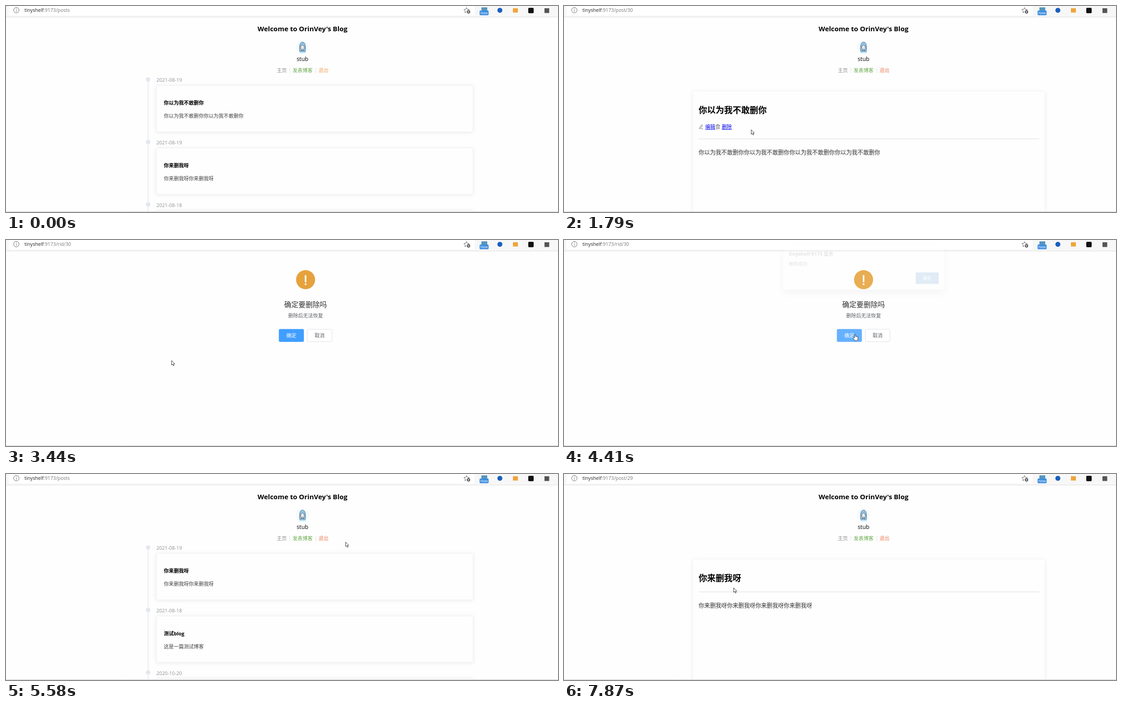
These frames come from a looping animation (1225 by 457 pixels, 8000 ms). An HTML page:

```html
<!DOCTYPE html>
<html lang="zh-CN">
<head>
<meta charset="utf-8">
<title>Blog</title>
<style>
html, body { margin: 0; width: 100%; height: 100%; overflow: hidden; background: #fefefe; }
svg { display: block; width: 1225px; height: 457px; }
text { font-family: "Open Sans", "Noto Sans CJK SC", "Noto Sans CJK", sans-serif; font-size: 11.06px; fill: #404245; white-space: pre; }
.mid { text-anchor: middle; }
.b { font-weight: 700; fill: #000; }
.url { font-size: 10.7px; fill: #767676; }
.url tspan { fill: #222; }
.date { font-size: 10.9px; fill: #8f9196; }
.h3 { font-size: 15px; }
.h2 { font-size: 18.9px; }
.body { font-size: 12.6px; fill: #333; }
.link { fill: #00e; text-decoration: underline; }
.card { fill: #fefefe; stroke: #eff1f6; filter: drop-shadow(0 1.6px 4.2px rgba(0,0,0,.08)); }
#sheet { stroke: none; }
.icon { fill: none; stroke: #5a5d62; stroke-width: .9; }
.dlg { filter: drop-shadow(0 8px 9px rgba(0,0,0,.32)); }

.scene, .anim { animation: 8s step-end infinite; }
#listA { --exit: #f2a35e; animation-name: listA; }
#postA { animation-name: postA; }
#remove { animation-name: remove; }
#listB { animation-name: listB; }
#postB { animation-name: postB; }
@keyframes listA { 0% { opacity: 1 } 18.125%, to { opacity: 0 } }
@keyframes postA { 0% { opacity: 0 } 18.125% { opacity: 1 } 43%, to { opacity: 0 } }
@keyframes remove { 0% { opacity: 0 } 43% { opacity: 1 } 67.125%, to { opacity: 0 } }
@keyframes listB { 0% { opacity: 0 } 67.125% { opacity: 1 } 85.25%, to { opacity: 0 } }
@keyframes postB { 0% { opacity: 0 } 85.25%, to { opacity: 1 } }

#titleA { animation-name: hoverA; }
#titleB { animation-name: hoverB; }
#del { animation-name: press; }
#ok { animation-name: okHover; }
#dialog { transform-origin: 665px 0; animation-name: dialog; }
@keyframes hoverA { 0% { fill: #000 } 10.5%, to { fill: #2a7556 } }
@keyframes hoverB { 0% { fill: #000 } 77.6%, to { fill: #2a7556 } }
@keyframes press { 0% { fill: #00e } 41.125%, to { fill: #f00 } }
@keyframes okHover { 0% { fill: #409eff } 51.5%, to { fill: #66b1ff } }
@keyframes dialog {
  0% { opacity: 0; transform: translateY(-14px) scale(1.014) }
  55.1% { opacity: .12; transform: translateY(-12.4px) scale(1.014) }
  56% { opacity: .45; transform: translateY(-7px) scale(1.008) }
  56.9% { opacity: .8; transform: translateY(-3px) scale(1.003) }
  57.8%, to { opacity: 1; transform: none }
}

#cursor { animation: move 8s steps(4, end) infinite, show 8s step-end infinite; }
#arrow { animation-name: arrow; }
#hand { animation-name: hand; }
#click { animation-name: click; }
@keyframes show { 0% { opacity: 0 } 1.625%, to { opacity: 1 } }
@keyframes move {
  0%, 1.625% { transform: translate(1033px, 446px) }
  5.125% { transform: translate(800px, 350px) }
  8.625% { transform: translate(480px, 238px) }
  11.375% { transform: translate(417px, 215px) }
  12.25%, 18.125% { transform: translate(415px, 213px) }
  21.625%, 23.25% { transform: translate(415px, 274px) }
  25% { transform: translate(385px, 272px) }
  28.5% { transform: translate(341px, 268px) }
  30.25% { transform: translate(367px, 268px) }
  32.875%, 43% { transform: translate(367px, 267px) }
  46.5% { transform: translate(450px, 245px) }
  50% { transform: translate(600px, 215px) }
  52.375%, 56% { transform: translate(646px, 209px) }
  59.5% { transform: translate(740px, 140px) }
  62.875%, 67.125% { transform: translate(793px, 92px) }
  70.625% { transform: translate(740px, 170px) }
  73.25% { transform: translate(636px, 236px) }
  75.875% { transform: translate(470px, 204px) }
  78.5%, 85.25% { transform: translate(371px, 214px) }
  87.875% { transform: translate(400px, 250px) }
  90.5% { transform: translate(437px, 270px) }
  93.125% { transform: translate(425px, 232px) }
  95.75% { transform: translate(385px, 262px) }
  98.375%, to { transform: translate(376px, 252px) }
}
@keyframes arrow {
  0%, 18.125%, 43%, 56.5%, 85.25% { opacity: 1 }
  10.5%, 28%, 51.5%, 77.6% { opacity: 0 }
  to { opacity: 1 }
}
@keyframes hand {
  0%, 18.125%, 43%, 56.5%, 85.25% { opacity: 0 }
  10.5%, 28%, 51.5%, 77.6% { opacity: 1 }
  to { opacity: 0 }
}
@keyframes click {
  0%, 17.4%, 43%, 55%, 67.125%, 85.25%, to { opacity: 0 }
  15.625%, 41.125%, 53.25%, 81.125% { opacity: .62 }
  63.75% { opacity: .5 }
}
</style>
</head>
<body>
<svg viewBox="0 0 1225 457">
  <defs>
    <g id="head">
      <text class="b h3 mid" x="658" y="55.5">Welcome to OrinVey's Blog</text>
      <circle cx="658" cy="91" r="14.5" fill="#f6fafd"/>
      <path d="M650.500 104.500q.5-5 7.500-5t7.500 5z" fill="#b5e0f5"/>
      <path d="M652 101q-1.500-5-.5-12 1-9 6.500-9t6.500 9q1 7-.5 12l-3-1h-6z" fill="#8fc3e6" stroke="#47647a" stroke-width=".9"/>
      <path d="M653.800 89q3-1 4.200-3 1.200 2 4.200 3v4q-.7 4-4.200 4.500-3.500-.5-4.200-4.500z" fill="#fff" stroke="#3c4650" stroke-width=".9"/>
      <path d="M655.300 91h1.700m2 0h1.700m-4 3.800h2.600M656 98v2.500m4-2.500v2.500" stroke="#333" stroke-width=".9"/>
      <text class="mid" x="658" y="122" style="font-size:12.6px;font-weight:500;fill:#000">stub</text>
      <text x="601" y="147.300" style="fill:#8e9095">主页</text>
      <text x="636" y="147.300" style="fill:#67a94a">发表博客</text>
      <text x="693.500" y="147.300" style="fill:var(--exit, #ea8158)">退出</text>
      <path d="M629.500 137v12M687.500 137v12" stroke="#dcdfe6"/>
    </g>
    <g id="item">
      <circle cx="315.300" cy="163" r="5" fill="#e4e7ed"/>
      <rect class="card" x="334" y="176.500" width="702.500" height="102.500" rx="3"/>
    </g>
    <g id="items">
      <path d="M315.500 163V457" stroke="#e4e7ed" stroke-width="1.600"/>
      <use href="#item"/>
      <use href="#item" y="138.600"/>
      <use href="#item" y="277.200"/>
    </g>
    <rect id="sheet" class="card" x="286.500" y="190" width="780.500" height="300" rx="3"/>
  </defs>

  <rect width="1225" height="457" fill="#fefefe"/>
  <rect width="1225" height="24" fill="#f7f7f7"/>
  <path d="M6 0H1040V17q0 4-4 4H10q-4 0-4-4z" fill="#fff"/>
  <path d="M0 24.500H1225" stroke="#dedede"/>
  <g fill="none" stroke="#666">
    <circle cx="23" cy="9.300" r="6"/>
    <path d="M23 8.500v4M23 5.800v1.300"/>
    <path d="M1022 3.500l1.800 3.800 4.200.5-3 3M1022 3.500l-1.800 3.800-4.200.5 3.100 2.900-.8 4.200 3.500-2"/>
  </g>
  <circle cx="1026.500" cy="13" r="3.700" fill="#555"/>
  <path d="M1024.500 13h4m-2-2v4" stroke="#fff" stroke-width=".9"/>
  <rect x="1055" y="3" width="13" height="8" fill="#5796bd"/>
  <rect x="1051" y="10" width="20" height="10.500" rx="2" fill="#3e8ede"/>
  <text class="mid" x="1061" y="18.300" style="font-size:8px;fill:#fff">New</text>
  <circle cx="1096" cy="9.500" r="5.500" fill="#1b5fbd"/>
  <rect x="1125" y="5" width="11" height="9.500" fill="#efa43c"/>
  <rect x="1159" y="4" width="12" height="12" rx="2" fill="#111"/>
  <rect x="1195" y="5" width="10.500" height="10.500" fill="#555"/>

  <g id="listA" class="scene">
    <text class="url" x="41" y="13.200"><tspan>tinyshelf</tspan>:9173/posts</text>
    <use href="#head"/>
    <use href="#items"/>
    <text class="date" x="333.700" y="168">2021-08-19</text>
    <text id="titleA" class="b anim" x="350.300" y="219">你以为我不敢删你</text>
    <text x="350.300" y="248.200">你以为我不敢删你你以为我不敢删你</text>
    <text class="date" x="333.700" y="306.600">2021-08-19</text>
    <text class="b" x="350.300" y="358">你来删我呀</text>
    <text x="350.300" y="387.300">你来删我呀你来删我呀</text>
    <text class="date" x="333.700" y="445.500">2021-08-18</text>
  </g>

  <g id="postA" class="scene">
    <text class="url" x="41" y="13.200"><tspan>tinyshelf</tspan>:9173/post/30</text>
    <use href="#head" x="6.700"/>
    <use href="#sheet"/>
    <text class="b h2" x="298.700" y="238">你以为我不敢删你</text>
    <path class="icon" d="M301 270l4.500-6.500 2 1.400-4.500 6.500-2.300 1zM304 272.500h4.500"/>
    <text class="link" x="313.500" y="272.300">编辑</text>
    <path class="icon" d="M336.500 264.500h9.500M339.500 264.500v-1.500h3.500v1.500M338 264.500v8h6.500v-8M340.300 266.500v4M342.300 266.500v4"/>
    <text id="del" class="link anim" x="350.300" y="272.300">删除</text>
    <path d="M299 294.800H1054.500" stroke="#dcdcdc"/>
    <text class="body" x="298.700" y="328.800">你以为我不敢删你你以为我不敢删你你以为我不敢删你你以为我不敢删你</text>
  </g>

  <g id="remove" class="scene">
    <text class="url" x="41" y="13.200"><tspan>tinyshelf</tspan>:9173/rid/30</text>
    <circle cx="664.800" cy="88" r="21.200" fill="#e6a23c"/>
    <path d="M664.800 79.500v13" stroke="#fff" stroke-width="3.600" stroke-linecap="round"/>
    <circle cx="664.800" cy="98" r="2" fill="#fff"/>
    <text class="mid" x="664.800" y="148.500" style="font-size:15.75px;fill:#303133">确定要删除吗</text>
    <text class="mid" x="664.800" y="172" style="fill:#606266">删除后无法恢复</text>
    <rect id="ok" class="anim" x="605.500" y="197.500" width="55.500" height="28.500" rx="3"/>
    <text class="mid" x="633.300" y="215.500" style="fill:#fff">确定</text>
    <rect x="668.500" y="198" width="55" height="27.500" rx="3" fill="#fff" stroke="#dcdfe6"/>
    <text class="mid" x="696" y="215.500" style="fill:#606266">取消</text>
    <g id="dialog" class="anim">
      <rect class="dlg" x="489" y="22" width="353" height="99" rx="3" fill="#fff"/>
      <text class="b" x="501" y="46" style="font-size:10.6px;fill:#1b1b1b">tinyshelf:9173 显示</text>
      <text x="501" y="68.400" style="font-size:10.3px;fill:#1b1b1b">删除成功</text>
      <rect x="779" y="83" width="50.300" height="25.300" rx="1.500" fill="#0060ae"/>
      <text class="mid" x="804" y="99.300" style="font-size:9.6px;fill:#fff">确定</text>
    </g>
  </g>

  <g id="listB" class="scene">
    <text class="url" x="41" y="13.200"><tspan>tinyshelf</tspan>:9173/posts</text>
    <use href="#head"/>
    <use href="#items"/>
    <text class="date" x="333.700" y="168">2021-08-19</text>
    <text id="titleB" class="b anim" x="350.300" y="219">你来删我呀</text>
    <text x="350.300" y="248.200">你来删我呀你来删我呀</text>
    <text class="date" x="333.700" y="306.600">2021-08-18</text>
    <text class="b" x="350.300" y="358">测试blog</text>
    <text x="350.300" y="387.300">这是一篇测试博客</text>
    <text class="date" x="333.700" y="445.500">2020-10-20</text>
  </g>

  <g id="postB" class="scene">
    <text class="url" x="41" y="13.200"><tspan>tinyshelf</tspan>:9173/post/29</text>
    <use href="#head" x="6.700"/>
    <use href="#sheet"/>
    <text class="b h2" x="298.700" y="238">你来删我呀</text>
    <path d="M299 261.500H1054.500" stroke="#dcdcdc"/>
    <text class="body" x="298.700" y="295.700">你来删我呀你来删我呀你来删我呀你来删我呀</text>
  </g>

  <path d="M0 456.500H1225" stroke="#c9c9c9"/>

  <g id="cursor" fill="#fff" stroke="#222" stroke-width=".9" stroke-linejoin="round">
    <path id="arrow" class="anim" d="M.5.500v10l2.300-2 1.700 3.600 1.600-.7-1.600-3.500h3z"/>
    <path id="hand" class="anim" d="M-1.200 8V1.200q0-1.200 1.100-1.200T1 1.200V5q1-.8 2 .3 1-.6 1.800.4 1.500-.5 1.500 1.300v3q0 4-3 4.500H0q-1.500-1.500-4-5.300-.6-1.500.6-1.900z"/>
    <circle id="click" class="anim" cx="-.5" r="9.700" fill="#ff0" stroke="none"/>
  </g>
</svg>
</body>
</html>
```
